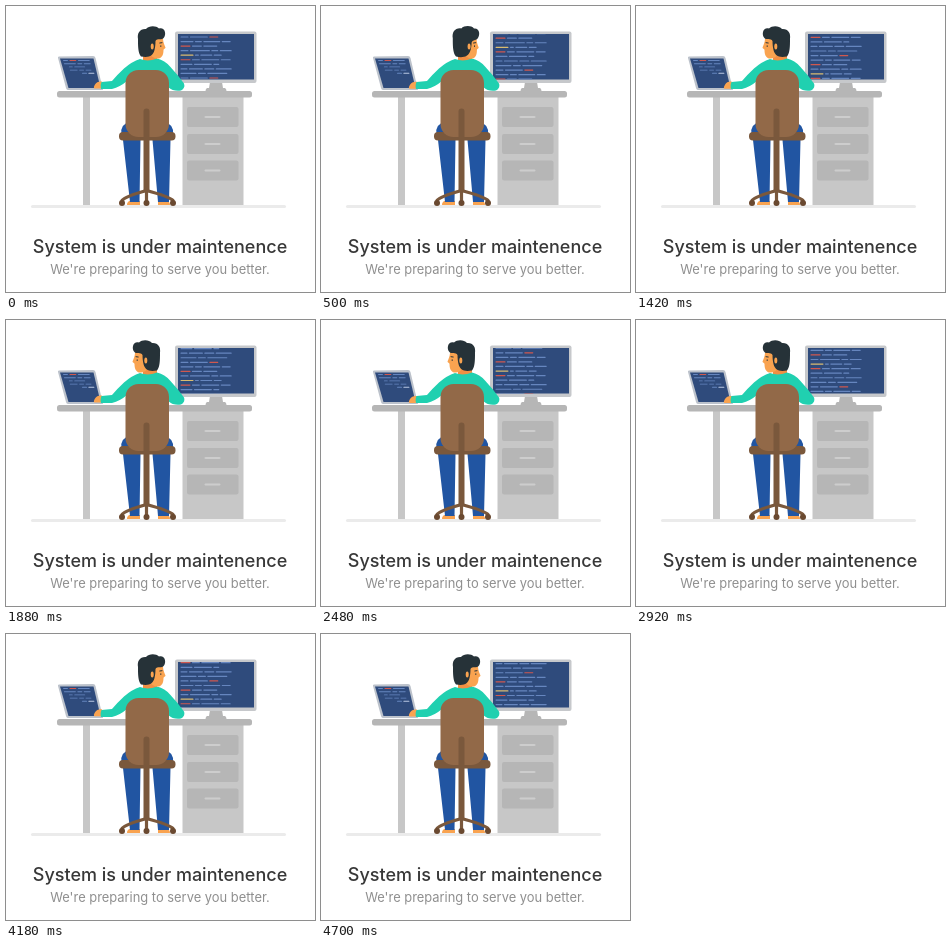
Write an HTML page that moves like this. It is 309x286 px and loops after 4.72 s.

```html
<!DOCTYPE html>
<html lang="en">
<head>
<meta charset="utf-8">
<title>System maintenance</title>
<style>
html, body { margin: 0; width: 100%; height: 100%; overflow: hidden; background: #fff; }
svg { display: block; width: 100vw; height: 100vh; }
text { font-family: Inter, sans-serif; text-anchor: middle; }
</style>
</head>
<body>
<svg viewBox="0 0 309 286" xmlns="http://www.w3.org/2000/svg">
  <defs><clipPath id="screen"><rect x="172" y="28" width="76" height="45.5"/></clipPath></defs>
  <rect width="309" height="286" fill="#fff"/>
  <rect x="25" y="199" width="255" height="3" rx="1.5" fill="#ebebeb"/>

  <!-- desk -->
  <rect x="77" y="90" width="7" height="109" fill="#c7c7c7"/>
  <rect x="176.5" y="90" width="61" height="109" fill="#c7c7c7"/>
  <g id="drawers"></g>
  <rect x="51" y="85" width="195" height="6.5" rx="2.5" fill="#b6b6b6"/>

  <!-- monitor -->
  <path d="M204 76H216L217 82H219Q220.500 83 220.500 85H199.500Q199.500 83 201 82H203Z" fill="#b6b6b6"/>
  <rect x="169" y="25.5" width="81.5" height="51.5" rx="2" fill="#c6c8cb"/>
  <rect x="172" y="28" width="76" height="45.5" fill="#2f4b7c"/>
  <g clip-path="url(#screen)"><g id="code"></g></g>

  <!-- laptop -->
  <path d="M53 50.5L87 50Q89 50 89.500 52L97 84H62Q60.500 84 60 82L52 52Q51.500 50.500 53 50.500Z" fill="#bcc2cb"/>
  <path d="M54 52.5H87.500L94.500 82H62.500Z" fill="#2f4b7c"/>
  <g id="notes"></g>

  <!-- legs -->
  <g fill="#f9a350">
    <path d="M123 195H134V199H121Q120.500 197 123 195Z"/>
    <path d="M152 195H162Q164.500 197 164 199H152Z"/>
  </g>
  <path d="M115.500 128Q114 118 124 116H158Q168 118 167 128L164.500 134L163 196H152L146.500 134H134.500L133.500 196H124L117 134Z" fill="#2155a2"/>

  <!-- body -->
  <path d="M137 44H151V58H137Z" fill="#f08f43"/>
  <g id="hand">
    <path d="M96 76Q91 75.500 89 79Q87 82 88.500 83H96Z" fill="#f9a350"/>
  </g>
  <path d="M134 53Q142 56 151 52.500Q159 54.500 164 60.500Q172 69 178 77.500Q179.500 82 175 84.500Q168 86 162 81V120H121V75Q114 81 106 83H95Q94 79 95.500 76L106 75Q111 69 118 62.500Q126 55.500 134 53Z" fill="#20d0b0"/>
  <g id="head">
    <path id="face" fill="#f9a350"/>
    <path id="eye" stroke="#263238" stroke-width="1" stroke-linecap="round" fill="none"/>
    <path id="hair" fill="#263238"/>
    <ellipse id="ear" cy="40.5" rx="1.5" ry="3" fill="#f9a350"/>
  </g>

  <!-- chair -->
  <rect x="113" y="126" width="56.5" height="8.5" rx="4" fill="#7a583c"/>
  <rect x="119.500" y="64" width="43.5" height="67" rx="13" fill="#926948"/>
  <rect x="137.500" y="102.5" width="6" height="84" rx="3" fill="#7a583c"/>
  <path d="M116 194.500Q119 190.500 140.500 184.500Q163 190.500 167 194.500M140.500 182V195" fill="none" stroke="#7a583c" stroke-width="3.2" stroke-linecap="round"/>
  <g fill="#6a4930">
    <circle cx="116" cy="197" r="3"/><circle cx="140.5" cy="197" r="3"/><circle cx="167" cy="197" r="3"/>
  </g>

  <text x="154" y="247.3" font-size="18" font-weight="500" fill="#383838">System is under maintenence</text>
  <text x="154" y="268" font-size="12.9" fill="#8f8f8f">We're preparing to serve you better.</text>
</svg>
<script>
const LOOP = 4720;
const SPEED = 0.0158;   // code scroll, px per ms
const ROW = 4.556;
const PERIOD = 9;
const CX = 143;
const COLORS = { b: '#6686bf', r: '#d0584f', y: '#d9bc70', w: '#b9c8e2' };
const $ = id => document.getElementById(id);

function add(parent, x, y, width, height, rx, fill) {
  const el = document.createElementNS('http://www.w3.org/2000/svg', 'rect');
  Object.entries({ x, y, width, height, rx, fill }).forEach(([k, v]) => el.setAttribute(k, v));
  parent.appendChild(el);
}

// A row such as "b10 r9": colour key and width of each dash
function drawRow(parent, row, x, y, h) {
  row.split(' ').forEach(part => {
    const w = +part.slice(1);
    add(parent, x, y - h / 2, w, h, h / 2, COLORS[part[0]]);
    x += w + 1.4;
  });
}

const rows = [
  'b8 b18 r9',
  'b13 b7 b17 b9',
  'r10 b10 b14',
  'b8 b20 b7 b12',
  'y13 b4 b12 b8',
  'r10 b8 b18 b10',
  'b12 b18 b6',
  'b7 b14 b10 b16',
  'b16 b8 b20'
];
for (let i = -1; i < 30; i++) {
  drawRow($('code'), rows[(i + PERIOD) % PERIOD], 174.5, 31 + i * ROW, 1.2);
}

['b5 r7 b12', 'b12 b5 b7', 'b4 b11', 'b8 b5 b6'].forEach((row, i) => {
  drawRow($('notes'), row, 57 + i * 0.9 + (i > 1 ? 4 : 0), 54.5 + i * 3.2, 0.9);
});
drawRow($('notes'), 'b5 w6', 76, 67.3, 1);

[101, 128, 154.5].forEach(y => {
  add($('drawers'), 181, y, 51.5, 20, 2, '#b6b6b6');
  add($('drawers'), 198.5, y + 9, 16, 2, 1, '#cdcdcd');
});

// Head outlines: x from the head centre, y on stage
const hairSide = [-8,50.5, -11,47,-11,40,-11,33, -12,27,-9,22.5,-3,23, 0,19.500,7,19.500,10,22.500, 16,21,17.500,28,15,31.500,
  13,34.500,8,32,6.500,35, 6.500,39,6,42,5.500,44, 4,50,0,52,-8,50.500];
const hairBack = [-8,51, -12,47,-12,38,-12,30, -13,23,-8,18.500,-2,20.500, 2,18.500,8,18.500,10,22.500, 12,24,12,27,12,30,
  12,36,12,38,12,41, 11,45,11,48,8,51, 5,53,-4,53,-8,51];
const faceSide = [3,34, 7,30,13,30,14,33, 14.300,37,15.500,39,16.500,41.500, 16.500,43,14.500,42.500,14.500,44,
  14.500,50,12,53,8,52.500, 3,52,0,48,0,44, 0,40,1,36,3,34];

const mix = (a, b, k) => a + (b - a) * k;

function outline(points) {
  const xy = [];
  for (let i = 0; i < points.length; i += 2) xy.push(points[i].toFixed(2) + ' ' + points[i + 1].toFixed(2));
  return 'M' + xy[0] + 'C' + xy.slice(1).join(' ') + 'Z';
}

function ease(t, start, end) {
  const k = Math.min(1, Math.max(0, (t - start) / (end - start)));
  return k * k * (3 - 2 * k);
}

function drawHead(turn) {
  const k = Math.abs(turn);
  const side = turn < 0 ? -1 : 1;
  const shrink = mix(0.5, 1, k);
  $('head').setAttribute('transform', `translate(${CX} 0) scale(${side} 1)`);
  $('hair').setAttribute('d', outline(hairBack.map((v, i) => mix(v, hairSide[i], k))));
  $('face').setAttribute('d', outline(faceSide.map((v, i) => i % 2 ? v : v * shrink)));
  const ex = 11.8 * shrink;
  $('eye').setAttribute('d', `M${ex - 1} 37L${ex + 1.2} 36.7M${ex} 39.8V40.5`);
  $('ear').setAttribute('cx', mix(11.8, 3.2, k));
}

function render(t) {
  drawHead(1 - 2 * ease(t, 460, 660) + 2 * ease(t, 3250, 3460));
  $('code').setAttribute('transform', `translate(0 ${-t * SPEED})`);
  const tap = Math.sin(t / LOOP * Math.PI * 2 * 10);
  $('hand').setAttribute('transform', `translate(0 ${-0.4 + 0.4 * tap})`);
}

function tick(now) {
  render(now % LOOP);
  requestAnimationFrame(tick);
}
render(0);
requestAnimationFrame(tick);
</script>
</body>
</html>
```
